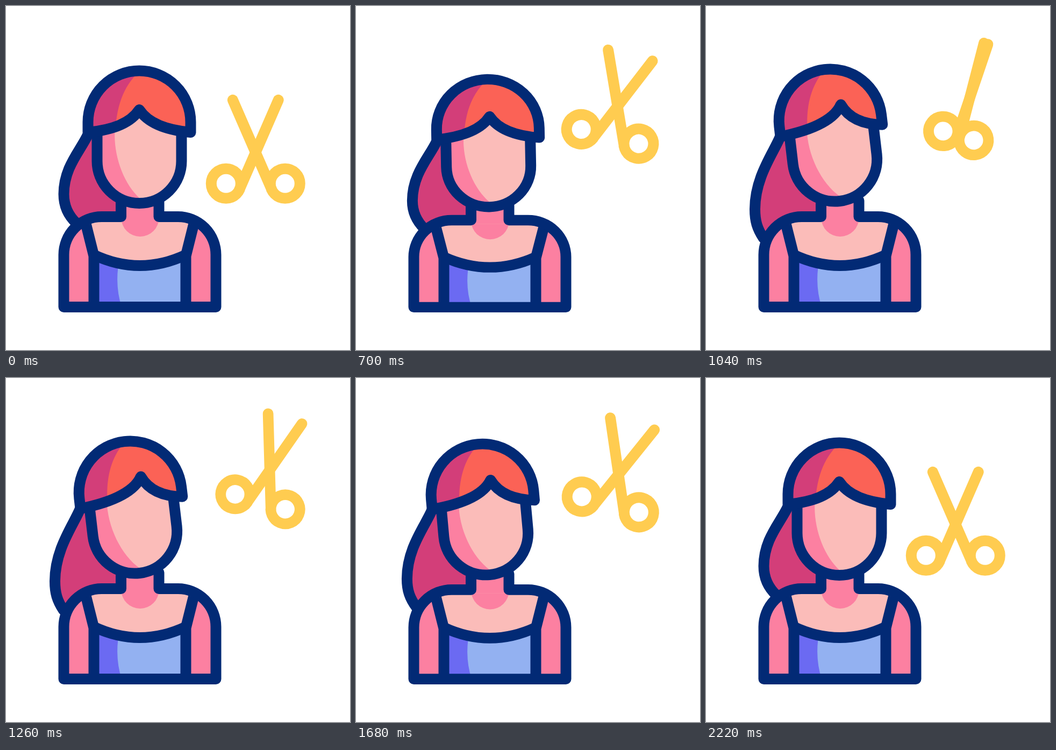
An HTML page with a canvas that plays this animation: 640x640 px, repeating every 2.4 s.

```html
<!DOCTYPE html>
<html lang="en">
<head>
<meta charset="utf-8">
<title>Haircut</title>
<style>
  html, body { margin: 0; width: 100%; height: 100%; overflow: hidden; background: #fff; }
  canvas { display: block; width: 640px; height: 640px; }
</style>
</head>
<body>
<canvas width="640" height="640"></canvas>
<script>
const ctx = document.querySelector('canvas').getContext('2d');
const LOOP = 2400, RAD = Math.PI / 180;
const NAVY = '#022a75', WINE = '#d33e79', ORANGE = '#fb6256', PINK = '#fc80a1',
      SKIN = '#fbbcb9', BLUE = '#93b1f1', VIOLET = '#6b6af2', YELLOW = '#ffcc50';

const smooth = x => x * x * (3 - 2 * x);
const ease = (t, from, to) => smooth(Math.min(1, Math.max(0, (t - from) / (to - from))));

function fill(d, color) {
  ctx.fillStyle = color;
  ctx.fill(new Path2D(d));
}

function line(d, color = NAVY) {
  ctx.strokeStyle = color;
  ctx.stroke(new Path2D(d));
}

function clipped(d, draw) {
  ctx.save();
  ctx.clip(new Path2D(d));
  draw();
  ctx.restore();
}

// The ponytail swings from its resting curve to a lower, wider one.
function drawPonytail(tilt) {
  const rest = [152, 240, 138, 270, 107.5, 300, 107.5, 350, 107.5, 372, 116, 390, 131, 404];
  const swung = [138, 243, 126, 273, 91, 318, 91, 378, 91, 400, 95, 414, 107, 432];
  const p = rest.map((v, i) => v + (swung[i] - v) * tilt);
  const d = `M${p.slice(0, 2)}C${p.slice(2)}`;
  fill(d + 'L214 400V290Z', WINE);
  line(d);
}

function drawBody() {
  const outline = 'M214 362V392H178A70.5 71 0 0 0 107.5 463V560H390.5V463' +
                  'A70.5 71 0 0 0 320 392H284.5V362';
  const neckline = 'M163.5 463Q249 503 334.5 463';
  const dress = neckline + 'V560H163.5Z';
  fill(outline + 'Z', PINK);
  const chest = neckline + 'L349 399H149Z';
  fill(chest, SKIN);
  clipped(chest, () => fill('M214.5 394a35 35 0 0 0 70 0Z', PINK));
  fill(dress, BLUE);
  clipped(dress, () => fill('M160 460H213Q200 517 216 562H160Z', VIOLET));
  line(neckline);
  line('M149 407L163.5 465V560M349 407L334.5 465V560');
  line(outline);
}

function drawHead(tilt) {
  ctx.save();
  ctx.translate(248, 360 - 4 * tilt);
  ctx.rotate(-6.7 * RAD * tilt);
  ctx.translate(-248, -360);

  const face = 'M169.5 232V288.5a78.5 78.5 0 0 0 157 0V232';
  const tip = [248 + 23 * tilt, 193 - 4 * tilt];
  const bangs = `M152.5 235C${196 + 6 * tilt} 231 ${231 + 23 * tilt} 219 ${tip}` +
                `C${265 + 19 * tilt} 219 ${300 + 12 * tilt} 231 343.5 235`;
  const hair = bangs + 'V216a95.5 95.5 0 0 0 -191 0Z';

  const skin = `${face}L${tip}Z`;
  fill(skin, SKIN);
  clipped(skin, () => fill('M203 180V225C198 275 218 330 249 358L160 370V180Z', PINK));
  line(face);

  fill(hair, WINE);
  clipped(hair, () => fill('M250 120C222 145 205 180 203 240H350V110H250Z', ORANGE));
  line(hair);
  ctx.restore();
}

function drawScissors(lift, close) {
  ctx.save();
  ctx.translate(464.3 + 26.4 * lift, 272.3 - 101.3 * lift);
  ctx.rotate(16.6 * RAD * lift);
  const cos = 1 - close + close * Math.cos(24 * RAD);
  const sin = close * Math.sin(24 * RAD);
  for (const side of [1, -1]) {
    ctx.save();
    ctx.scale(side, 1);
    ctx.transform(cos, sin, -sin, cos, 0, 0);
    line('M-42.5 -97.5L30 69M82.5 58a27.5 27.5 0 1 0 -55 0a27.5 27.5 0 1 0 55 0', YELLOW);
    ctx.restore();
  }
  ctx.restore();
}

function frame(now) {
  const t = now % LOOP;
  const squash = ease(t, 400, 600) - ease(t, 600, 1000) + ease(t, 1580, 1900) - ease(t, 1900, 2220);
  const tilt = ease(t, 600, 1000) - ease(t, 1580, 1900);
  const lift = ease(t, 400, 800) - ease(t, 1565, 2220);
  // Two snips, each closing and opening in 200 ms.
  const close = t > 800 && t < 1600 ? smooth(1 - Math.abs(1 - t % 400 / 200)) : 0;

  ctx.fillStyle = '#fff';
  ctx.fillRect(0, 0, 640, 640);
  ctx.lineWidth = 20;
  ctx.lineCap = ctx.lineJoin = 'round';

  ctx.save();
  ctx.translate(0, 570);
  ctx.scale(1, 1 - 0.0434 * squash);
  ctx.translate(0, -570);
  drawPonytail(tilt);
  drawBody();
  drawHead(tilt);
  ctx.restore();
  drawScissors(lift, close);
}

const start = performance.now();
(function tick() {
  frame(performance.now() - start);
  requestAnimationFrame(tick);
})();
</script>
</body>
</html>
```
